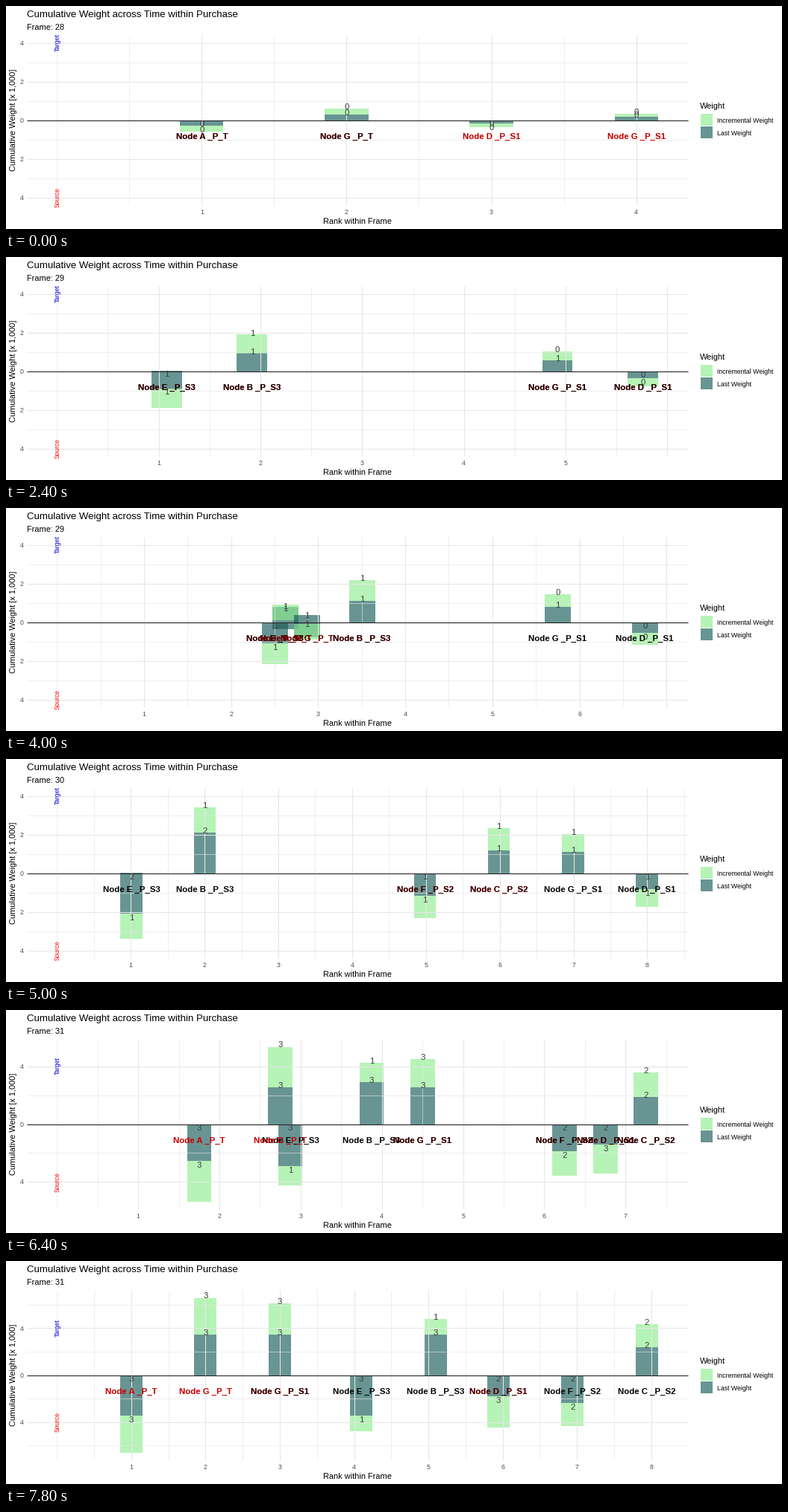
A matplotlib script for the animation above (8 s loop, 1040x300 px).

```python
import matplotlib.pyplot as plt
from matplotlib.animation import FuncAnimation
from matplotlib.patches import Rectangle

plt.rcParams["font.family"] = "Liberation Sans"

W, H, DPI = 1040, 300, 100
LEFT, RIGHT, ZERO_Y, HALF = 28, 914, 153.5, 114.4
ORIGIN_X = LEFT + (RIGHT - LEFT) / 22
HOLD, STEPS = 4, 11          # still frames at the start, frames per transition
GREEN, TEAL, ALPHA = "#90ee90", "#175c59", 0.65
GRID, TICK = "#e6e6e6", "#4d4d4d"

A, GT, G, D = "A _P_T", "G _P_T", "G _P_S1", "D _P_S1"
E, B, F, C = "E _P_S3", "B _P_S3", "F _P_S2", "C _P_S2"
BELOW = {A, D, E, F}

# node: (rank, last weight, total weight, darkness of its label)
STATES = [
    {D: (3, .17, .365, .12), G: (4, .16, .33, .12),
     A: (1, .3, .6, .85), GT: (2, .3, .6, .85)},
    {E: (1, 1.03, 2.1, .94), B: (2, 1.03, 2.1, .94), G: (5, .6, 1.08, 1),
     D: (6, .365, .827, 1), A: (3, .6, 1.1, .3), GT: (4, .6, 1.1, .3)},
    {E: (1, 2.1, 3.4, 1), B: (2, 2.1, 3.4, 1), F: (5, 1.17, 2.33, .82),
     C: (6, 1.17, 2.33, .78), G: (7, 1.1, 2.04, 1), D: (8, .827, 1.75, 1),
     A: (3, 1.1, 3.415, .1), GT: (4, 1.1, 3.415, .1)},
    {G: (3, 3.4, 6.0, .82), E: (4, 3.4, 4.77, 1), B: (5, 3.4, 4.77, 1),
     D: (6, 1.75, 4.39, .72), F: (7, 2.33, 4.28, 1), C: (8, 2.33, 4.28, 1),
     A: (1, 3.41, 6.5, .1), GT: (2, 3.41, 6.5, .1)},
    {G: (3, 6.0, 10.5, .82), E: (8, 4.77, 6, 1), B: (9, 4.77, 6, 1),
     D: (3.5, 4.39, 8, .72), F: (4.5, 4.28, 7, 1), C: (5.5, 4.28, 7, 1),
     A: (1, 6.5, 10.7, .1), GT: (2, 6.5, 10.7, .1)},
]
# Bars that turn into another node during a transition
MORPHS = [{A: B, GT: E}, {A: B, GT: E, E: F, B: C}, {}, {}]

fig = plt.figure(figsize=(W / DPI, H / DPI), dpi=DPI, facecolor="white")
ax = fig.add_axes([0, 0, 1, 1])


def px(size):
    return size * 72 / DPI


def ease(t):
    return 4 * t ** 3 if t < .5 else 1 - 4 * (1 - t) ** 3


def mix(a, b, e):
    return a + (b - a) * e


def text(x, y, s, size, color="black", **kw):
    kw = {"ha": "left", "va": "baseline", **kw}
    return ax.text(x, y, s, fontsize=px(size), color=color, **kw)


def line(xs, ys, color, width):
    ax.plot(xs, ys, color=color, lw=px(width), solid_capstyle="butt")


def box(x0, x1, y0, y1, color):
    ax.add_patch(Rectangle((x0, y0), x1 - x0, y1 - y0, fc=color,
                           alpha=ALPHA, lw=0))


def extents(node, last, total):
    """(bottom, top) of the last and the incremental segment."""
    if node in BELOW:
        return (-last, 0), (-total, -last)
    return (0, last), (last, total)


def tween(k, e):
    """All bars of transition k at eased progress e."""
    bars = []
    for node, (rank, last, total, dark) in STATES[k].items():
        goal = MORPHS[k].get(node, node)
        rank2, last2, total2, dark2 = STATES[k + 1][goal]
        segments = [tuple(mix(p, q, e) for p, q in zip(s, s2))
                    for s, s2 in zip(extents(node, last, total),
                                     extents(goal, last2, total2))]
        shift = mix(5 if node in BELOW else -3, 5 if goal in BELOW else -3, e)
        name, lo, hi = (node, last, total) if e < .5 else (goal, last2, total2)
        bars.append(dict(x=mix(rank, rank2, e), segments=segments, shift=shift,
                         name="Node " + name, dark=mix(dark, dark2, e),
                         counts=(round(lo), round(hi - lo))))
    return bars


def draw_grid(X, Y, x_max, y_max):
    top, bottom = ZERO_Y - HALF, ZERO_Y + HALF
    for i in range(int(2 * x_max) + 2):
        x = X(i / 2)
        if x > RIGHT:
            continue
        major = i > 0 and i % 2 == 0
        line([x, x], [top, bottom], GRID, 1.07 if major else .6)
        if major and i / 2 <= x_max:
            text(x, 280, str(i // 2), 8.8, TICK, ha="center")
    step = 2 if y_max < 5 else 4
    for i in range(-8, 9):
        v = i * step / 2
        y = Y(v)
        if not top < y < bottom:
            continue
        major = i % 2 == 0
        line([LEFT, RIGHT], [y, y], GRID, 1.07 if major else .6)
        if major:
            text(23.5, y + 3.1, f"{abs(v):.0f}", 8.8, TICK, ha="right")


def draw_frame_text(title_number):
    text(28, 15, "Cumulative Weight across Time within Purchase", 13.2)
    text(28, 32, f"Frame: {title_number}", 11)
    text(471, 293, "Rank within Frame", 11, ha="center")
    text(10, ZERO_Y, "Cumulative Weight [x 1,000]", 11, ha="center",
         va="center", rotation=90)
    text(930, 138, "Weight", 11)
    box(931, 947, 145, 161, GREEN)
    box(931, 947, 162, 178, TEAL)
    text(953, 157, "Incremental Weight", 8.8)
    text(953, 174, "Last Weight", 8.8)


def draw(n):
    ax.clear()
    ax.set(xlim=(0, W), ylim=(H, 0))
    ax.axis("off")

    k, part = divmod(max(0, n - HOLD), STEPS)
    e = ease(part / STEPS)
    bars = tween(k, e)
    x_max = max(b["x"] for b in bars) + .15
    y_max = max([4] + [abs(v) for b in bars for s in b["segments"] for v in s])

    def X(v):
        return ORIGIN_X + v * (RIGHT - LEFT) / 1.1 / x_max

    def Y(v):
        return ZERO_Y - v * HALF / 1.1 / y_max

    draw_grid(X, Y, x_max, y_max)
    draw_frame_text(28 + k + (e >= .5))

    for b in bars:
        for (lo, hi), color in zip(b["segments"], (TEAL, GREEN)):
            box(X(b["x"] - .15), X(b["x"] + .15), Y(hi), Y(lo), color)
    line([LEFT, RIGHT], [ZERO_Y, ZERO_Y], "#222222", 1.07)

    for b in bars:
        for (lo, hi), count in zip(b["segments"], b["counts"]):
            text(X(b["x"]), Y(hi) + b["shift"] + 4, str(count), 11.38,
                 "#3a3a3a", ha="center")
    for b in bars:
        place = dict(ha="center", weight="bold")
        if b["dark"] < .99:
            text(X(b["x"]), 179, b["name"], 11.38, "#e00000", **place)
        text(X(b["x"]), 179, b["name"], 11.38, alpha=b["dark"], **place)

    panel = Rectangle((LEFT, ZERO_Y - HALF), RIGHT - LEFT, 2 * HALF,
                      transform=ax.transData)
    for s, v, color in (("Target", 4, "#0000e6"), ("Source", -4, "#ff0000")):
        label = text(68.8, Y(v), s, 8.54, color, ha="center", va="center",
                     rotation=90)
        label.set_clip_path(panel)
    return []


anim = FuncAnimation(fig, draw, frames=HOLD + 36, interval=200,
                     init_func=lambda: [], repeat=True, repeat_delay=0)
plt.show()
```
